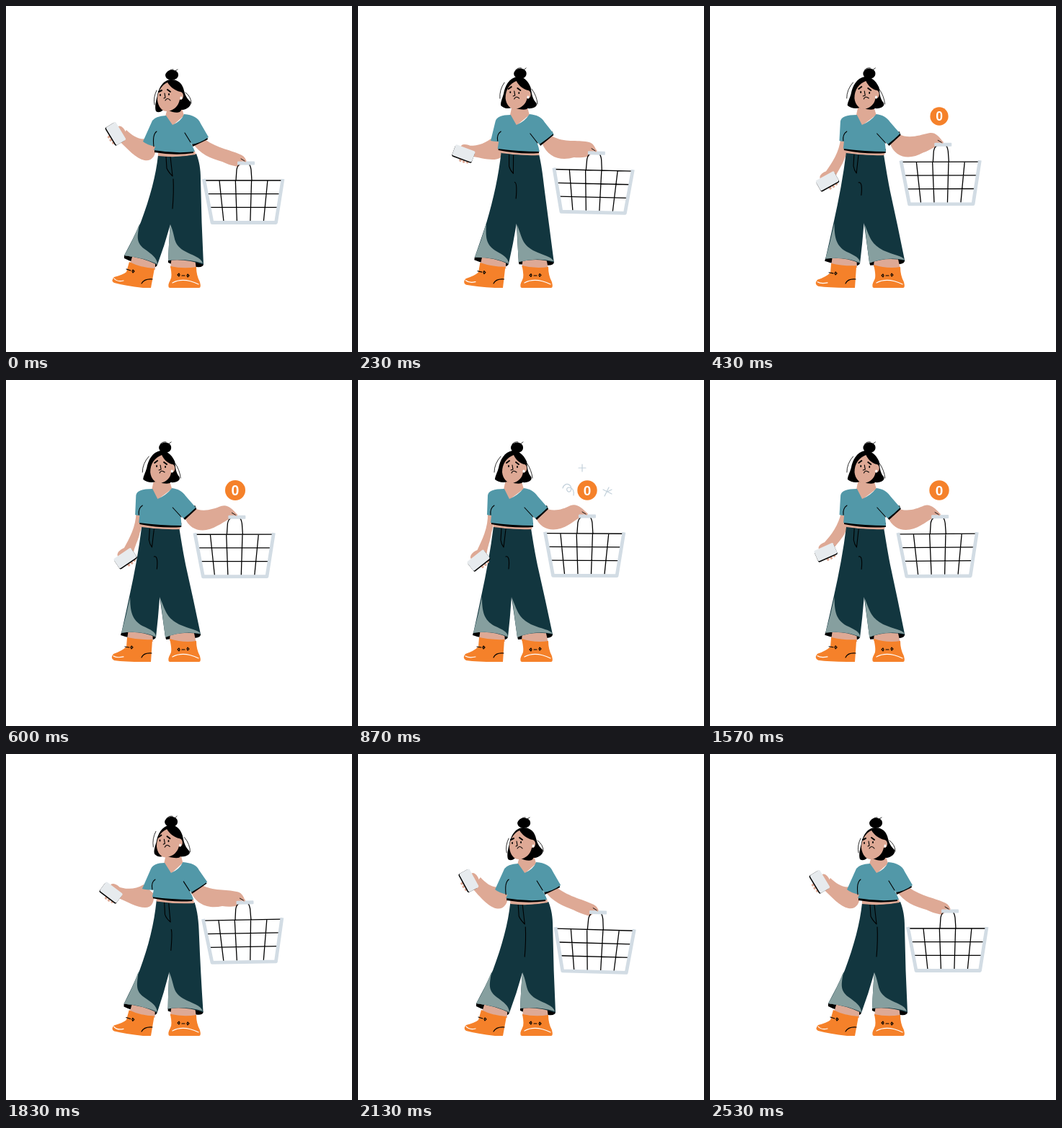
An HTML page that plays this animation: 480 px wide and 480 px high, repeating every 3 s.

```html
<!DOCTYPE html>
<html lang="en">
<head>
<meta charset="utf-8">
<title>Empty basket</title>
<style>
  html, body { margin: 0; width: 100%; height: 100%; overflow: hidden; background: #fff; }
  svg { display: block; width: 100vw; height: 100vh; }
  text { font: bold 19px "Liberation Sans", Arial, sans-serif; }
</style>
</head>
<body>
<svg id="stage" viewBox="0 0 480 480"></svg>
<script>
const LOOP = 3000;
const SKIN = '#dea995', TEAL = '#5298a8', NAVY = '#12363f', GREY = '#869f9f',
      ORANGE = '#f5812a', PALE = '#d2dce4', INK = '#000';
const stage = document.getElementById('stage');

function add(tag, attrs, parent = stage) {
  const el = document.createElementNS('http://www.w3.org/2000/svg', tag);
  for (const k in attrs) el.setAttribute(k, attrs[k]);
  parent.appendChild(el);
  return el;
}
const line = (color, width) => ({
  fill: 'none', stroke: color, 'stroke-width': width,
  'stroke-linecap': 'round', 'stroke-linejoin': 'round'
});
const clamp = x => Math.max(0, Math.min(1, x));
const easeOut = x => 1 - (1 - clamp(x)) ** 3;

// Smooth monotone curve through [time, value] keys.
function curve(keys) {
  const slope = i => (keys[i + 1][1] - keys[i][1]) / (keys[i + 1][0] - keys[i][0]);
  const tangent = i => {
    if (i === 0 || i === keys.length - 1) return 0;
    const a = slope(i - 1), b = slope(i);
    return a * b <= 0 ? 0 : 2 * a * b / (a + b);
  };
  return t => {
    let i = 0;
    while (i < keys.length - 2 && t > keys[i + 1][0]) i++;
    const [t0, a] = keys[i], [t1, b] = keys[i + 1];
    const d = t1 - t0, x = clamp((t - t0) / d), y = 1 - x;
    return a * (1 + 2 * x) * y * y + b * x * x * (3 - 2 * x)
      + d * x * y * (tangent(i) * y - tangent(i + 1) * x);
  };
}

// 0 = looking at the phone, 1 = holding up the basket
const phoneSwing = curve([[0, 0], [215, .45], [430, .93], [870, 1], [1300, .99], [1570, .89],
  [1700, .62], [1830, .3], [2130, -.04], [2530, 0], [LOOP, 0]]);
const basketLift = curve([[0, 0], [215, .33], [430, .8], [870, 1], [1300, 1], [1570, .96],
  [1700, .67], [1830, .3], [2130, -.04], [2530, 0], [LOOP, 0]]);
const bodyLean = curve([[0, 0], [215, .5], [430, .96], [870, 1], [1300, 1], [1570, .95],
  [1700, .55], [1830, .1], [2130, -.01], [2530, 0], [LOOP, 0]]);
const basketTilt = curve([[0, 0], [215, 1.4], [430, -.2], [870, .3], [1300, 0], [1570, -.4],
  [1830, -1], [2130, 1.6], [2530, 0], [LOOP, 0]]);
const badgeSize = curve([[240, 0], [430, .92], [540, 1.04], [680, 1], [1570, 1], [1610, .96],
  [1760, 0], [LOOP, 0]]);

// Quadratic through a start, a passing pose at .3 and an end.
function through(a, m, b, u) {
  const q = (m - a - .3 * (b - a)) / -.21;
  return a + (b - a - q) * u + q * u * u;
}

const NUM = /-?\d*\.?\d+/g;
const numbers = d => d.match(NUM).map(Number);
const refill = (d, vals) => { let i = 0; return d.replace(NUM, () => vals[i++].toFixed(2)); };

const parts = [];
// A body part with its two extreme poses; upper points rise sooner than they lean.
function part(attrs, from, to) {
  const el = add('path', attrs), a = numbers(from), b = numbers(to);
  parts.push((lean, rise) => el.setAttribute('d', refill(from, a.map((n, i) => {
    const k = i % 2 ? lean + (rise - lean) * clamp((340 - n) / 130) : lean;
    return n + (b[i] - n) * k;
  }))));
}
function limb(attrs, poses) {
  const el = add('path', attrs), [a, m, b] = poses.map(numbers);
  return u => el.setAttribute('d', refill(poses[0], a.map((n, i) => through(n, m[i], b[i], u))));
}
const fill = c => ({ fill: c });
const thin = line(INK, 1.1);

// Trouser openings, ankles, shoes
part(fill(INK), 'M164,346 Q190,349 210,359 Q208,364 201,362 Q175,356 164,350Z',
                'M160,350 Q185,347 208,357 Q206,361 198,361 Q172,359 159,354Z');
part(fill(INK), 'M225,352 Q250,350 274,358 Q274,363 264,362 Q235,361 225,356Z',
                'M221,356 Q245,346 270,352 Q271,357 262,358 Q240,358 222,360Z');
part(fill(SKIN), 'M176,345 L207,356 L207,366 L172,358Z', 'M170,345 L203,350 L204,363 L168,359Z');
part(fill(SKIN), 'M230,348 L262,350 L264,365 L228,363Z', 'M228,348 L260,347 L264,365 L227,362Z');
part(fill(ORANGE),
  'M171,355 Q187,363 206,364 L201,391 L190,391 Q165,388 150,384 Q145,381 150,376 Q162,373 167,369Z',
  'M168,357 Q185,361 203,360 L201,391 L190,391 Q165,391 150,389 Q144,386 149,380 Q161,376 167,370Z');
part(fill(ORANGE),
  'M228,361 Q246,365 264,362 Q264,374 269,383 Q271,391 268,391 L227,391 Q223,389 228,380 Q231,376 228,361Z',
  'M227,359 Q246,365 264,362 Q264,374 269,383 Q271,391 268,391 L227,391 Q223,389 228,380 Q231,376 227,359Z');
part(line('#fff', 1.2), 'M150,378 Q154,383 163,381', 'M149,383 Q154,386 163,384');
part(line('#fff', 1.2), 'M231,384 Q246,376 267,386', 'M231,384 Q246,376 267,386');
part(thin, 'M188,385 Q192,378 203,379', 'M188,385 Q191,378 202,379');
part(thin, 'M167,365 L173,367 M175,368 L176,366 L178,368 L176,370Z',
           'M165,370 L171,371 M173,371 L174,369 L176,371 L174,373Z');
part(thin, 'M238,373 L240,371 L241,373 L240,375Z M244,374 L248,374 M251,374 L252,372 L254,374 L252,376Z',
           'M238,374 L240,372 L241,374 L240,376Z M244,374 L248,374 M251,373 L252,371 L254,373 L252,375Z');

// Arms
const phoneArm = limb(fill(SKIN), [
  'M194,184 C185,186 175,180 167,172 L157,187 C168,198 181,212 192,214 C202,216 208,208 208,196Z',
  'M191,181 C178,189 165,188 152,183 L152,198 C168,205 182,213 193,213 C202,213 206,206 205,194Z',
  'M180,184 C181,205 172,222 165,237 L178,245 C179,232 184,222 185,212 C187,206 188,200 188,190Z'
]);
const basketArm = limb(fill(SKIN), [
  'M272,182 C290,197 310,199 325,206 C330,208 332,211 333,214 L322,223 C312,221 306,219 300,216 C285,212 268,205 259,190Z',
  'M270,181 C288,191 305,187 320,191 C326,192 329,196 331,202 L320,211 C312,212 306,212 300,211 C282,215 264,210 256,190Z',
  'M256,176 C270,184 283,180 295,174 C303,171 310,176 319,186 L308,191 C301,194 298,198 292,201 C276,211 255,211 246,190Z'
]);

// Trousers
part(fill(NAVY),
  'M211,207 Q238,211 264,205 C268,215 270,226 270,240 Q271,300 274,359 Q250,350 225,353 Q226,325 228,303 Q220,332 210,359 Q190,349 164,346 Q176,324 187,300 C200,265 208,235 211,207Z',
  'M188,203 Q215,208 240,206 C242,218 244,232 249,257 Q260,305 270,353 Q245,347 221,357 Q217,328 213,301 Q211,330 208,357 Q185,347 160,351 Q166,324 171,300 C178,268 184,235 188,203Z');
part(fill(GREY),
  'M185,302 C183,318 179,327 192,337 C203,345 209,349 210,358 Q190,349 164,346 Q176,326 185,302Z',
  'M172,301 C172,322 175,333 189,341 C202,347 207,349 208,356 Q185,347 160,351 Q167,326 172,301Z');
part(fill(GREY),
  'M228,303 C236,322 231,329 246,339 C260,347 270,348 273,357 Q250,350 225,353 Q226,325 228,303Z',
  'M214,303 C222,324 224,330 240,339 C256,346 266,346 270,352 Q245,347 221,357 Q217,328 214,303Z');
part(thin, 'M222,209 L223,225 Q225,230 231,236 L228,209 M232,240 Q233,258 231,281',
           'M199,206 L198,222 Q199,228 202,232 L205,207 M205,245 C211,243 209,262 212,286');

// Neck, shirt
part(fill(SKIN), 'M211,199 L262,201 L263,206 Q238,211 211,208Z',
                 'M187,196 L242,201 L241,207 Q215,208 188,204Z');
part(fill(INK), 'M206,198 L260,198 L260,204 Q235,208 206,203Z',
                'M185,196 L243,198 L243,204 Q215,206 185,200Z');
part(fill(INK), 'M257,188 L278,178 L280,185 L259,195Z', 'M241,186 L262,174 L264,179 L248,194Z');
part(fill(SKIN), 'M224,142 L244,142 L247,152 L231,166 L221,153Z',
                 'M205,138 L226,138 L230,151 L210,166 L202,152Z');
part(fill(TEAL),
  'M222,152 L231,165 Q243,160 247,150 C259,151 267,155 270,163 L281,182 Q270,190 258,192 L255,188 Q260,196 262,202 Q235,205 205,200 L207,195 Q196,193 190,188 L203,159 Q207,153 222,152Z',
  'M203,151 L210,165 Q222,160 230,150 C238,151 244,154 249,161 L263,177 Q255,185 246,192 L242,188 Q243,196 243,202 Q215,202 184,198 L185,188 Q182,188 179,187 L180,160 Q181,151 203,151Z');
part(thin, 'M209,174 Q203,178 205,195 M248,176 L256,189',
           'M189,174 Q183,178 184,187 M231,177 L243,190');

// Head
part(fill(INK),
  'M229,102 C217,103 212,114 210,124 C208,132 206,140 208,146 C212,149 216,146 220,143 L231,147 C238,149 243,147 243,144 C251,145 260,136 255,132 C249,126 248,121 246,114 C243,105 236,102 229,102Z',
  'M214,98 C203,100 197,111 195,122 C193,129 190,134 190,138 C195,142 202,143 207,141 L216,143 C222,144 227,144 228,142 C236,143 243,139 240,134 C235,128 235,121 234,113 C229,102 222,98 214,98Z');
part(fill(INK), 'M221,96 C222,87 238,86 239,95 C240,104 222,106 221,96Z',
                'M212,94 C212,85 228,84 229,93 C230,103 213,104 212,94Z');
part(line(INK, .8),
  'M224,92 Q227,88 232,88 M235,90 L238,88 M209,117 Q204,127 206,137 M249,120 Q257,126 257,135',
  'M214,89 Q217,85 222,86 M225,89 L229,86 M198,106 Q189,116 189,128 M234,115 Q241,125 242,136');
part(fill(SKIN),
  'M224,106 C215,110 210,120 210,130 C211,140 217,147 224,146 C233,145 239,139 241,130 C247,131 248,120 242,119 C236,118 228,113 224,106Z',
  'M216,104 C206,108 200,116 200,128 C201,138 208,144 215,143 C222,141 228,136 229,128 C235,130 236,118 231,117 C225,116 219,111 216,104Z');
part(line(INK, 2), 'M212,119 L216,117 M224,116 L228,119', 'M206,115 L210,112 M219,114 L223,117');
part(line(INK, 1.8), 'M214,123 L214,124 M226,122 L226,123', 'M209,119 L209,120 M221,120 L221,121');
part(thin, 'M220,121 L221,127 L219,128 M221,131 Q224,126 228,131',
           'M214,118 L215,124 L212,125 M213,129 Q215,124 220,128');
part(line('#fff', 3), 'M243,127 L243,128', 'M230,126 L230,127');

// Phone and the hand behind it
const phone = add('g');
add('ellipse', { cx: 2, cy: -8, rx: 9, ry: 5, fill: SKIN }, phone);
add('path', { d: 'M-2,4 L-1,11 M3,4 L4,11 M8,4 L9,10', ...line(SKIN, 3.4) }, phone);
add('rect', { x: -14.5, y: -6.5, width: 29, height: 16, rx: 2, fill: INK }, phone);
add('rect', { x: -14.5, y: -8, width: 29, height: 16, rx: 2, fill: '#e7ebee' }, phone);

// Basket, drawn around the middle of its grip
const basket = add('g');
let wires = 'M-14,24 L-13,9 Q-12,3 -8,1 M8,24 L7,9 Q6,3 4,1';
for (let i = 0; i < 4; i++) {
  const x = -37 + i * 22.3;
  wires += ` M${x},24 L${x * .83 - .4},80`;
}
for (let i = 0; i < 3; i++) wires += ` M${-58 + i * 3.6},${24 + i * 18.7} L${51 - i * 3},${24 + i * 18.7}`;
add('path', { d: wires, ...line(INK, 1.3) }, basket);
add('path', { d: 'M-58.5,22 L-47,82.5 L41.5,82.5 L51,22', ...line(PALE, 4.8), 'stroke-linecap': 'butt' }, basket);
add('rect', { x: -12, y: -2.5, width: 24, height: 5, rx: 1, fill: PALE }, basket);
add('path', { d: 'M-12,-4 Q-5,-7 -1,-3', ...line(SKIN, 3) }, basket);
add('path', { d: 'M-7,-6 L-2,-3', ...line(INK, .9) }, basket);

// Counter badge with sparkles
const sparks = [
  [311, 122, 'M0,-5 V5 M-5,0 H5'],
  [291, 151, 'M-7,-1 C-4,-11 8,-6 4,3 C0,7 -4,-1 1,-2 C7,-2 9,3 8,9'],
  [346, 155, 'M-6,-3 L6,3 M-4,6 L2,-6 M0,0 L6,-3']
].map(([x, y, d]) => ({ x, y, el: add('path', { d, ...line('#c3d1db', 1.2) }) }));
const badge = add('g');
add('circle', { r: 13.7, fill: ORANGE }, badge);
add('text', { y: 6.8, 'text-anchor': 'middle', fill: '#fff' }, badge).textContent = '0';

function draw(t) {
  const u = phoneSwing(t), w = basketLift(t), lean = bodyLean(t);
  const rise = 1 - (1 - clamp(u)) ** 6;
  parts.forEach(pose => pose(lean, rise));
  phoneArm(u);
  basketArm(w);
  phone.setAttribute('transform', `translate(${through(152.5, 146, 167, u)},${through(177, 192, 250, u)}) rotate(${through(59, 37, -38, u)})`);
  basket.setAttribute('transform', `translate(${through(333, 331.5, 318, w)},${through(218, 206, 189, w)}) rotate(${basketTilt(t)})`);

  const size = badgeSize(t);
  badge.setAttribute('transform', `translate(318,153) scale(${size})`);
  badge.setAttribute('visibility', size > .01 ? 'visible' : 'hidden');

  const k = easeOut((t - 560) / 310), fade = 1 - clamp((t - 950) / 150);
  for (const { x, y, el } of sparks) {
    el.setAttribute('transform', `translate(${318 + (x - 318) * k},${153 + (y - 153) * k}) scale(${k})`);
    el.setAttribute('opacity', t < 560 ? 0 : fade);
  }
}

const start = performance.now();
function tick() {
  draw((performance.now() - start) % LOOP);
  requestAnimationFrame(tick);
}
draw(0);
requestAnimationFrame(tick);
</script>
</body>
</html>
```
